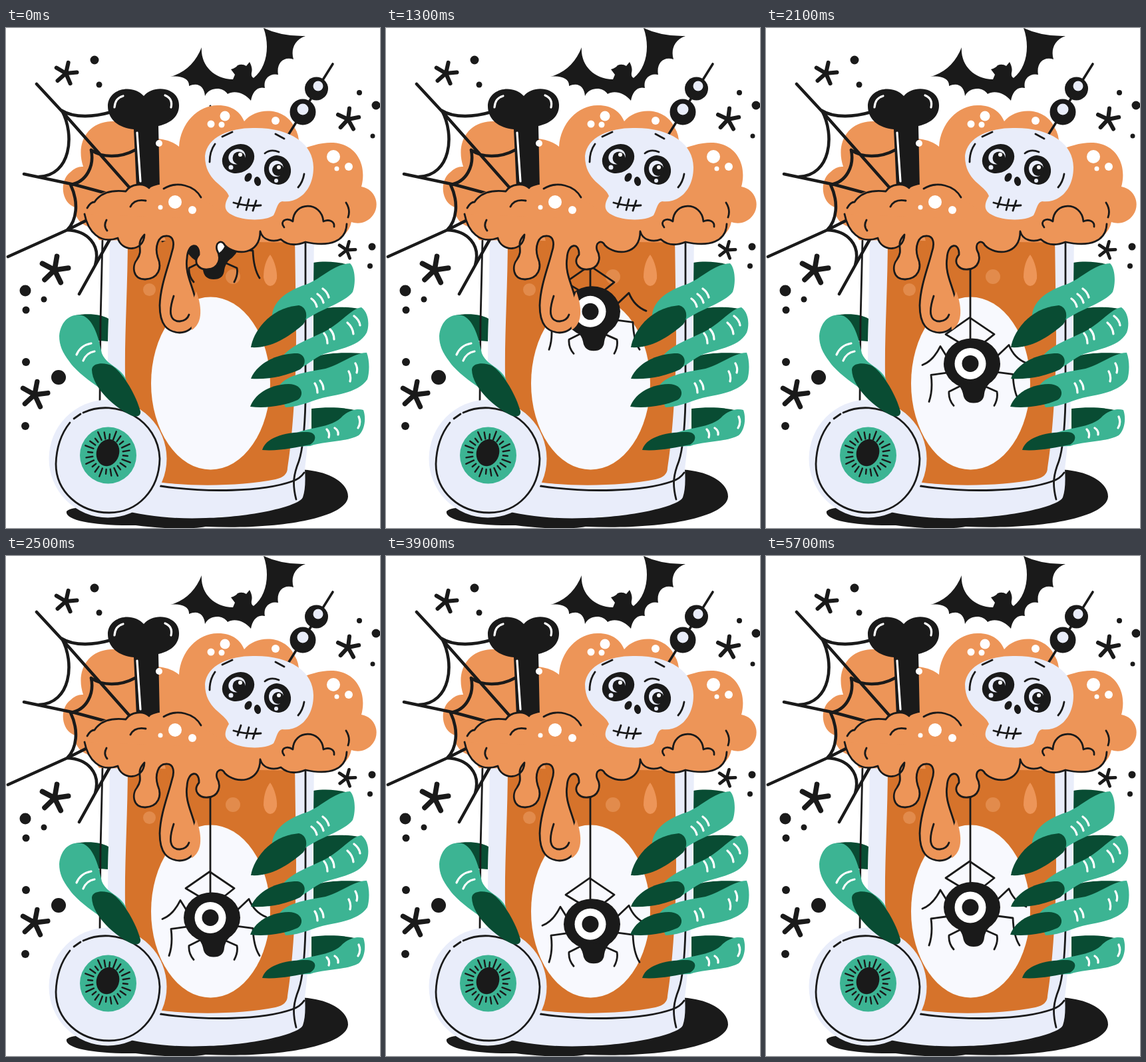
An HTML page for the animation above (8 s loop, 562x750 px).

```html
<!DOCTYPE html>
<html lang="en">
<head>
<meta charset="utf-8">
<title>Halloween drink</title>
<style>
  html, body { margin: 0; width: 100%; height: 100%; overflow: hidden; background: #fff; }
  svg { display: block; width: 562px; height: 750px; }
  .line { fill: none; stroke: #1a1a1a; stroke-width: 2.8; stroke-linecap: round; stroke-linejoin: round; }
  .thick { stroke-width: 4.6; }
  .shine { stroke: #fff; stroke-width: 3.2; }
  .ink { fill: #1a1a1a; }
  .foam { fill: #ed9558; }
  .liquid { fill: #d6732b; }
  .pale { fill: #e9edfa; }
  .white { fill: #fff; }
  .skin { fill: #3cb493; }
  .dark { fill: #094c33; }
</style>
</head>
<body>
<svg viewBox="0 0 562 750">
  <g id="specks" class="ink"></g>

  <!-- bat -->
  <path class="ink" d="M247 73Q280 64 294 29C292 54 311 77 341 77L344 70L338 62Q345 60 348 56Q355 53 361 57L366 51Q371 60 369 67Q368 73 372 75C392 60 397 27 387 0Q415 13 450 12C432 18 428 34 432 47C416 42 406 54 409 70C396 67 386 77 389 90C377 87 370 97 368 109C358 97 343 93 333 99C325 87 305 89 299 102C298 87 288 81 275 87C276 76 263 71 247 73Z"/>

  <!-- ground shadow -->
  <path class="ink" d="M440 662C488 664 514 683 514 703C512 735 410 753 300 748C270 753 225 750 195 746C130 747 88 738 91 725C100 716 130 721 160 720L430 690Z"/>

  <!-- hand behind the glass -->
  <g class="dark">
    <path d="M104 431C125 427 144 430 154 436L153 470L128 468Z"/>
    <path d="M462 352C480 349 500 351 514 355L480 388L462 391Z"/>
    <path d="M462 424C485 417 512 418 530 421L490 452L462 465Z"/>
    <path d="M462 494C485 486 515 487 536 488L490 512L462 518Z"/>
    <path d="M459 571C483 568 510 569 528 574L500 599L459 602Z"/>
  </g>

  <!-- glass -->
  <path class="pale" d="M156 310L152 560L170 722C210 733 260 737 300 735C365 734 440 718 446 704Q451 690 449 662C457 600 460 530 461 470L463 310Z"/>
  <path class="liquid" d="M183 310C183 390 178 460 179 520C182 580 190 640 206 677C260 689 350 688 405 677Q423 673 423 660C431 610 436 530 436 460L434 310Z"/>
  <path class="line" d="M145 318L142 440L141 560M450 320L450 560C449 600 446 632 440 650C432 670 430 684 436 707M232 687C300 697 385 696 430 680Q442 676 448 667"/>
  <ellipse cx="307.500" cy="533" rx="89.500" ry="129.500" fill="#f8f9fe"/>
  <g fill="#e28b4c">
    <circle cx="215.500" cy="392.500" r="9.500"/>
    <circle cx="341" cy="373" r="11"/>
    <path class="foam" d="M397 340C403 348 408 364 407 376Q404 387 397 387Q389 386 387 374C387 359 391 347 397 340Z"/>
  </g>

  <!-- spider, with its eye at height 0 -->
  <g id="spider">
    <g class="line">
      <path d="M307 -201V-35"/>
      <path d="M290 -32L270 -44L306 -69L343 -44L328 -32M272 -10L262 -26Q251 -4 235 2M346 -10L365 -28Q373 -8 391 -1M270 14L248 17Q251 40 245 57M348 13L371 16Q372 43 381 57M291 34L275 42Q274 54 282 63M329 34L347 42Q349 52 343 63"/>
    </g>
    <g class="ink">
      <ellipse cx="309.500" rx="42.500" ry="38"/>
      <path d="M287 30Q294 36 296 45Q298 59 312 59Q327 59 328 45Q329 37 336 29Z"/>
    </g>
    <circle class="white" cx="307" r="23.500"/>
    <circle class="ink" cx="307" r="12.500"/>
  </g>

  <!-- fingers -->
  <g class="skin">
    <path d="M400 437C398 412 420 395 450 385C475 376 490 355 517 353C526 362 525 386 521 396C508 413 468 423 447 440L420 455Z"/>
    <path d="M412 498C425 475 458 467 485 452C508 437 520 421 534 419C546 428 546 447 542 457C532 476 505 481 484 487C465 492 455 505 440 511Z"/>
    <path d="M408 541C417 521 450 516 480 511C507 503 523 487 542 487C547 500 546 518 543 527C532 544 505 549 484 553C462 557 445 568 420 569Z"/>
    <path d="M428 612C444 599 484 602 503 585C514 573 528 570 537 573C542 587 538 604 530 611C513 621 475 620 457 627L432 628Z"/>
  </g>
  <g class="dark">
    <path d="M368 479C371 458 394 420 440 416C454 419 454 438 445 446C424 464 397 481 368 479Z"/>
    <path d="M368 526C375 507 402 488 438 488C451 490 452 505 442 512C423 521 395 528 368 526Z"/>
    <path d="M367 568C373 551 393 535 425 534C447 535 448 552 438 558C420 566 393 571 367 568Z"/>
    <path d="M385 633C390 616 414 606 453 606C468 607 467 619 457 625C436 629 410 635 385 633Z"/>
  </g>
  <path class="line shine" d="M459 406Q465 410 467 418M468 399Q475 404 477 412M476 391Q483 396 485 404M478 458Q483 464 483 473M487 452Q493 458 493 467M513 442Q521 449 522 459M523 432Q531 438 532 446M464 533Q468 539 468 547M472 529Q477 535 477 542M515 515Q519 522 517 530M525 503Q529 510 527 517M482 602Q487 607 485 614M494 600Q500 604 499 610M530 583Q534 592 529 600"/>

  <!-- foam at the back -->
  <path class="foam" d="M130 300C112 296 103 285 104 269C82 262 80 228 97 216Q106 207 116 208C105 175 120 142 158 140C180 140 190 145 196 153L228 166Q248 168 260 178C262 142 290 115 319 116C340 116 352 126 358 140C376 118 420 118 434 150Q442 162 440 184C454 177 476 171 492 172C526 174 543 205 534 238C556 242 562 266 552 280C544 292 530 295 519 291C514 315 490 325 450 322L150 318Z"/>

  <path class="line thick" d="M46 84L85 126L187 241M27 219L103 235L155 249M3 343L92 303L128 285M110 399L134 356L156 317M84 124C104 136 134 133 158 126M84 124C104 161 97 221 50 223M128 183C144 195 172 195 194 183M128 183C133 207 121 231 97 235M97 235C110 262 106 289 92 303C122 304 143 325 134 356"/>

  <!-- bone -->
  <path class="ink" d="M192 152C169 150 152 137 153 115C156 90 190 84 207 102C222 84 260 89 260 116C260 134 246 143 229 147L231 240H196Z"/>
  <path class="line shine" d="M163 119Q164 105 176 102M248 119Q251 106 239 101M197 157L202 230"/>

  <!-- foam at the front -->
  <g class="line foam" style="fill:#ed9558">
    <path stroke="none" d="M118 285C116 260 150 235 180 245C186 235 204 231 216 240C235 229 280 231 300 260L400 320L140 318Z"/>
    <path class="liquid" stroke="none" d="M238 311Q258 313 259 326Q256 338 246 346Z"/>
    <path d="M118 279C123 305 141 325 168 315C173 336 207 337 208 310C193 326 208 331 197 347C189 357 190 377 209 377C229 376 235 360 228 344C223 328 229 312 240 312C252 311 254 323 249 337C243 361 232 387 231 416C231 445 242 456 261 457C283 456 290 436 286 414C283 390 268 370 272 345C273 322 291 321 290 340C280 352 290 363 303 362C320 361 324 345 317 333C314 322 324 316 329 326C345 342 382 341 382 305C386 320 403 321 413 317C425 328 440 325 450 321C487 329 511 320 512 294"/>
    <path stroke="none" d="M286 395C296 423 294 444 279 453L276 420Z"/>
    <path d="M418 299C410 289 422 284 431 290C432 260 474 259 477 290C487 286 494 291 493 298"/>
  </g>
  <path class="line" d="M122 270Q127 261 133 261C144 244 163 243 180 245C188 233 207 232 215 240M237 241C257 229 283 236 293 254M187 268Q193 256 210 259M151 288Q146 297 152 304M511 262Q518 273 514 284M252 402C244 426 246 440 261 440Q272 439 275 430"/>
  <g id="bubbles" class="white"></g>

  <!-- cocktail stick -->
  <path class="line" style="stroke-width:3.6" d="M491 54L420 167"/>
  <circle class="ink" cx="466.500" cy="91" r="17.500"/><circle class="pale" cx="469" cy="87" r="7.500"/>
  <circle class="ink" cx="446" cy="126" r="19.500"/><circle class="pale" cx="446" cy="122" r="8.500"/>

  <!-- skull -->
  <path class="pale" d="M299 192C302 162 339 149 375 150C428 150 462 174 462 209C462 244 439 263 415 260C407 262 407 272 402 281C390 290 356 289 341 281C327 275 327 265 335 252C329 235 299 230 299 192Z"/>
  <g class="ink">
    <ellipse cx="349" cy="196" rx="25" ry="21" transform="rotate(-28 349 196)"/>
    <ellipse cx="408" cy="213" rx="20" ry="22" transform="rotate(-15 408 213)"/>
    <ellipse cx="364" cy="224" rx="5" ry="7" transform="rotate(30 364 224)"/>
    <ellipse cx="378" cy="230" rx="5" ry="7" transform="rotate(-15 378 230)"/>
  </g>
  <g class="pale">
    <ellipse cx="347" cy="193" rx="13" ry="11" transform="rotate(-25 347 193)"/>
    <ellipse cx="406" cy="211" rx="11" ry="12"/>
    <circle cx="338" cy="209" r="3.500"/><circle cx="406" cy="229" r="3"/>
  </g>
  <g class="ink">
    <circle cx="350" cy="195" r="9.500"/><circle cx="409" cy="213" r="9"/>
  </g>
  <circle class="white" cx="352" cy="190" r="3"/><circle class="white" cx="410" cy="209" r="3"/>
  <path class="line" d="M342 262Q362 268 383 266M353 254L348 269M365 257L361 273M376 259L371 274M389 188Q398 181 410 186M306 201Q306 185 314 174M325 163L340 156M405 159L418 166M448 219Q446 231 439 239"/>

  <!-- eyeball -->
  <circle class="pale" cx="153" cy="646" r="88.500"/>
  <path class="line" d="M116 577C166 554 229 588 231 646C230 693 198 727 155 727C110 727 75 695 75 654Q76 617 96 592M102 586L112 579"/>
  <circle class="skin" cx="153.500" cy="641" r="42.500"/>
  <g id="iris" class="line" style="stroke-width:2.400"></g>
  <ellipse class="ink" cx="153" cy="637" rx="17" ry="20.500" transform="rotate(18 153 637)"/>

  <!-- thumb -->
  <path class="skin" d="M80 462C82 439 98 426 117 432C132 440 139 463 144 488C152 507 171 507 181 528L150 546C128 532 105 515 95 500C85 487 80 476 80 462Z"/>
  <path class="dark" d="M129 513C129 502 148 501 160 507C177 519 195 550 202 575C203 583 195 584 188 581C164 570 130 540 129 513Z"/>
  <path class="line shine" d="M106 490Q112 476 128 473M116 499Q121 487 133 485"/>
</svg>
<script>
const byId = id => document.getElementById(id);
const dots = list => list.map(([x, y, r]) => `<circle cx="${x}" cy="${y}" r="${r}"/>`).join('');

function spokes(x, y, count, turn, inner, outer) {
  let d = '';
  for (let i = 0; i < count; i++) {
    const a = turn + i * 2 * Math.PI / count;
    const c = Math.cos(a), s = Math.sin(a), far = outer(i);
    d += `M${x + c * inner} ${y + s * inner}L${x + c * far} ${y + s * far}`;
  }
  return d;
}

const star = ([x, y, r, turn]) =>
  `<path class="line" style="stroke-width:${r * .32}" d="${spokes(x, y, 5, turn, 0, () => r * .87)}"/>`;

byId('specks').innerHTML = dots([
  [133, 48, 6.5], [140, 85, 4.5], [531, 97, 4], [556, 116, 6.5], [551, 162, 3.5],
  [29, 394, 8.5], [30, 423, 5.5], [57, 407, 4.5], [30, 501, 6], [79, 524, 11],
  [29, 597, 6], [550, 328, 5.5], [547, 357, 4]
]) + [
  [90, 68, 19, -1.35], [514, 137, 19, -1.45], [73, 363, 24, -1.4],
  [512, 333, 15, -1.3], [43, 550, 23, -1.38]
].map(star).join('');

byId('bubbles').innerHTML = dots([
  [329, 132, 7.5], [308, 144, 5.5], [324, 145, 4.5], [405, 139, 6], [492, 193, 10],
  [497, 211, 3.5], [515, 208, 6], [254, 261, 10], [280, 273, 6], [232, 269, 3.5], [230, 173, 5]
]);

byId('iris').innerHTML = `<path d="${spokes(153, 639, 24, .1, 23, i => 30 + i * 5 % 3 * 3)}"/>`;

// Drop for 25 steps, rest, then climb a little for 25 steps.
const clamp = n => Math.max(0, Math.min(25, n));
function draw(now) {
  const tick = Math.floor(now % 8000 / 100);
  const y = 318 + 9.76 * clamp(tick - 2) - 1.4 * clamp(tick - 32);
  byId('spider').setAttribute('transform', `translate(0 ${y})`);
  requestAnimationFrame(draw);
}
draw(performance.now());
</script>
</body>
</html>
```
